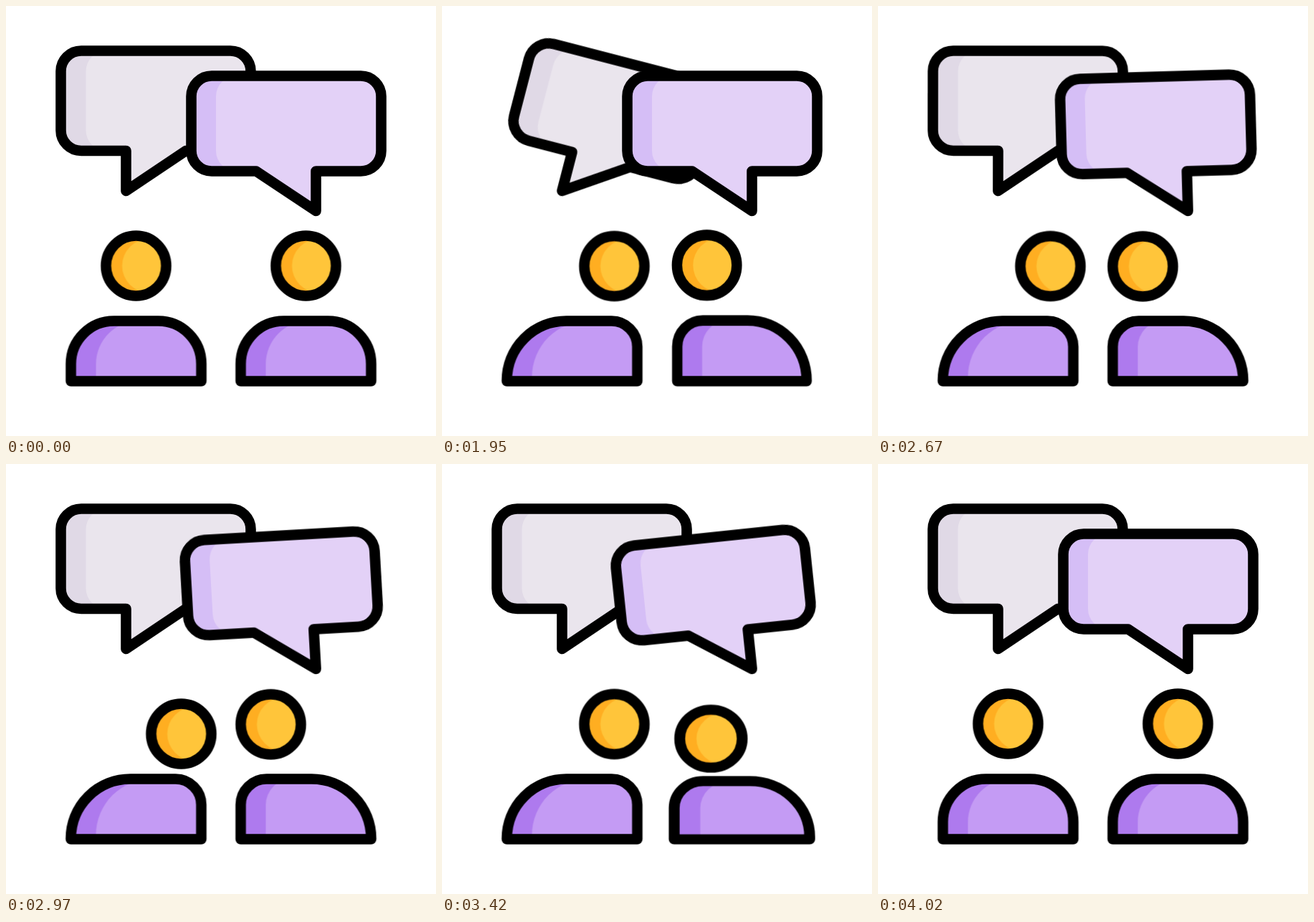
Write an HTML page that moves like this. It is 600 px wide and 600 px high and loops after 4050 ms.

```html
<!DOCTYPE html>
<html lang="en">
<head>
<meta charset="utf-8">
<title>Conversation</title>
<style>
  html, body { margin: 0; width: 100%; height: 100%; overflow: hidden; background: #fff; }
  svg { display: block; width: 100%; height: 100%; }

  .line { fill: none; stroke: #000; stroke-width: 14.6; stroke-linejoin: round; }
  .skin { fill: #ffae21; }
  .skin-light { fill: #ffc53a; }
  .shirt { fill: #ae7aee; }
  .shirt-light { fill: #c49bf4; }

  /* Every part runs on the same loop; --at shifts where it begins. */
  .talk, .squash, .dip, .nod, .turn, .shape, .light {
    animation: 4050ms cubic-bezier(.37, 0, .63, 1) var(--at, 0ms) infinite;
  }

  /* Bubbles swing around the tip of the tail. */
  .talk { animation-name: talk; }
  .grey { --at: -2556ms; transform-origin: 167.5px 258px; }
  .lilac { --at: -1416ms; transform-origin: 432.5px 286px; }
  @keyframes talk {
    0%, 29.63%, 100% { transform: rotate(0deg); }
    5.06% { transform: rotate(-20.7deg); }
    11.65% { transform: rotate(14.8deg); }
    17.36% { transform: rotate(-8.8deg); }
    23.7% { transform: rotate(3deg); }
  }

  /* Each turn begins with a squash and ends with a small stretch. */
  .left .go { --at: -2550ms; }
  .left .back { --at: -480ms; }
  .right .go { --at: -2450ms; }
  .right .back { --at: -710ms; }

  .squash { animation-name: squash; transform-origin: 0 531px; }
  @keyframes squash {
    0%, 10.62%, 100% { transform: scale(1, 1); }
    3.21% { transform: scale(1.056, .953); }
    7.41% { transform: scale(.988, 1.012); }
  }

  .dip { animation-name: dip; transform-origin: 0 362.5px; }
  @keyframes dip {
    0%, 10.62%, 100% { transform: translateY(0) scale(1, 1); }
    3.21% { transform: translateY(29px) scale(1.054, .946); }
    7.41% { transform: translateY(-2.5px) scale(.99, 1.01); }
  }

  .nod { animation-name: nod; }
  @keyframes nod {
    0%, 53.58%, 65.93%, 78.27%, 100% { transform: translate(0, 0); }
    59.75%, 72.1% { transform: translate(4.4px, 15px); }
  }

  .left .turn { animation-name: turn-left; }
  @keyframes turn-left {
    0%, 37.04%, 97.04%, 100% { transform: translate(0, 0); }
    45.93%, 88.15% { transform: translate(59px, .5px); }
  }
  .right .turn { animation-name: turn-right; }
  @keyframes turn-right {
    0%, 39.51%, 91.36%, 100% { transform: translate(0, 0); }
    48.4%, 82.47% { transform: translate(-49px, .8px); }
  }

  /* Shoulders: one corner opens while the other tightens. */
  .shape { d: path("M-91 523.5V499.5A60 60 0 0 1 -31 439.5H31A60 60 0 0 1 91 499.5V523.5Z"); }
  .light { d: path("M-56 523.5V499.5A60 60 0 0 1 4 439.5H31A60 60 0 0 1 91 499.5V523.5Z"); }
  .left .shape { animation-name: shape-left; }
  .left .light { animation-name: light-left; }
  .right .shape { animation-name: shape-right; }
  .right .light { animation-name: light-right; }
  @keyframes shape-left {
    0%, 37.04%, 97.04%, 100% { d: path("M-91 523.5V499.5A60 60 0 0 1 -31 439.5H31A60 60 0 0 1 91 499.5V523.5Z"); }
    45.93%, 88.15% { d: path("M-91 523.5V522.5A83 83 0 0 1 -8 439.5H55A36 36 0 0 1 91 475.5V523.5Z"); }
  }
  @keyframes light-left {
    0%, 37.04%, 97.04%, 100% { d: path("M-56 523.5V499.5A60 60 0 0 1 4 439.5H31A60 60 0 0 1 91 499.5V523.5Z"); }
    45.93%, 88.15% { d: path("M-56 523.5V517.5A78 78 0 0 1 22 439.5H55A36 36 0 0 1 91 475.5V523.5Z"); }
  }
  @keyframes shape-right {
    0%, 39.51%, 91.36%, 100% { d: path("M-91 523.5V499.5A60 60 0 0 1 -31 439.5H31A60 60 0 0 1 91 499.5V523.5Z"); }
    48.4%, 82.47% { d: path("M-91 523.5V475.5A36 36 0 0 1 -55 439.5H8A83 83 0 0 1 91 522.5V523.5Z"); }
  }
  @keyframes light-right {
    0%, 39.51%, 91.36%, 100% { d: path("M-56 523.5V499.5A60 60 0 0 1 4 439.5H31A60 60 0 0 1 91 499.5V523.5Z"); }
    48.4%, 82.47% { d: path("M-56 523.5V475.5A36 36 0 0 1 -20 439.5H8A83 83 0 0 1 91 522.5V523.5Z"); }
  }
</style>
</head>
<body>
<svg viewBox="0 0 600 600">
  <defs>
    <path id="grey" d="M105 62.5H313A28.5 28.5 0 0 1 341.5 91V173.5A28.5 28.5 0 0 1 313 202H251L167.5 258V202H105A28.5 28.5 0 0 1 76.5 173.5V91A28.5 28.5 0 0 1 105 62.5Z"/>
    <path id="lilac" d="M287 97.5H495A28.5 28.5 0 0 1 523.5 126V202A28.5 28.5 0 0 1 495 230.5H432.5V286L349 230.5H287A28.5 28.5 0 0 1 258.5 202V126A28.5 28.5 0 0 1 287 97.5Z"/>
    <clipPath id="face"><circle cy="362.5" r="42"/></clipPath>
    <g id="head">
      <circle class="skin" cy="362.5" r="42"/>
      <circle class="skin-light" cx="18" cy="362.5" r="37.5" clip-path="url(#face)"/>
      <circle class="line" cy="362.5" r="42"/>
    </g>
  </defs>

  <g class="talk grey">
    <use href="#grey" fill="#e0d9e6"/>
    <path fill="#eae5ed" d="M140 62.5H313A28.5 28.5 0 0 1 341.5 91V173.5A28.5 28.5 0 0 1 313 202H251L167.5 258V202H140A28.5 28.5 0 0 1 111.5 173.5V91A28.5 28.5 0 0 1 140 62.5Z"/>
    <use href="#grey" class="line"/>
  </g>

  <g class="talk lilac">
    <use href="#lilac" fill="#d5bef6"/>
    <path fill="#e3d1f7" d="M321.5 97.5H495A28.5 28.5 0 0 1 523.5 126V202A28.5 28.5 0 0 1 495 230.5H432.5V286L349 230.5H321.5A28.5 28.5 0 0 1 293 202V126A28.5 28.5 0 0 1 321.5 97.5Z"/>
    <use href="#lilac" class="line"/>
  </g>

  <g class="left" transform="translate(181.5 0)">
    <g class="squash go"><g class="squash back">
      <g style="--at: 0ms">
        <path class="shape shirt"/>
        <path class="light shirt-light"/>
        <path class="shape line"/>
      </g>
    </g></g>
    <g class="turn"><g class="nod">
      <g class="dip go"><g class="dip back"><use href="#head"/></g></g>
    </g></g>
  </g>

  <g class="right" transform="translate(418.5 0)">
    <g class="squash go"><g class="squash back">
      <g style="--at: 0ms">
        <path class="shape shirt"/>
        <path class="light shirt-light"/>
        <path class="shape line"/>
      </g>
    </g></g>
    <g class="turn">
      <g class="dip go"><g class="dip back"><use href="#head"/></g></g>
    </g>
  </g>
</svg>
</body>
</html>
```
